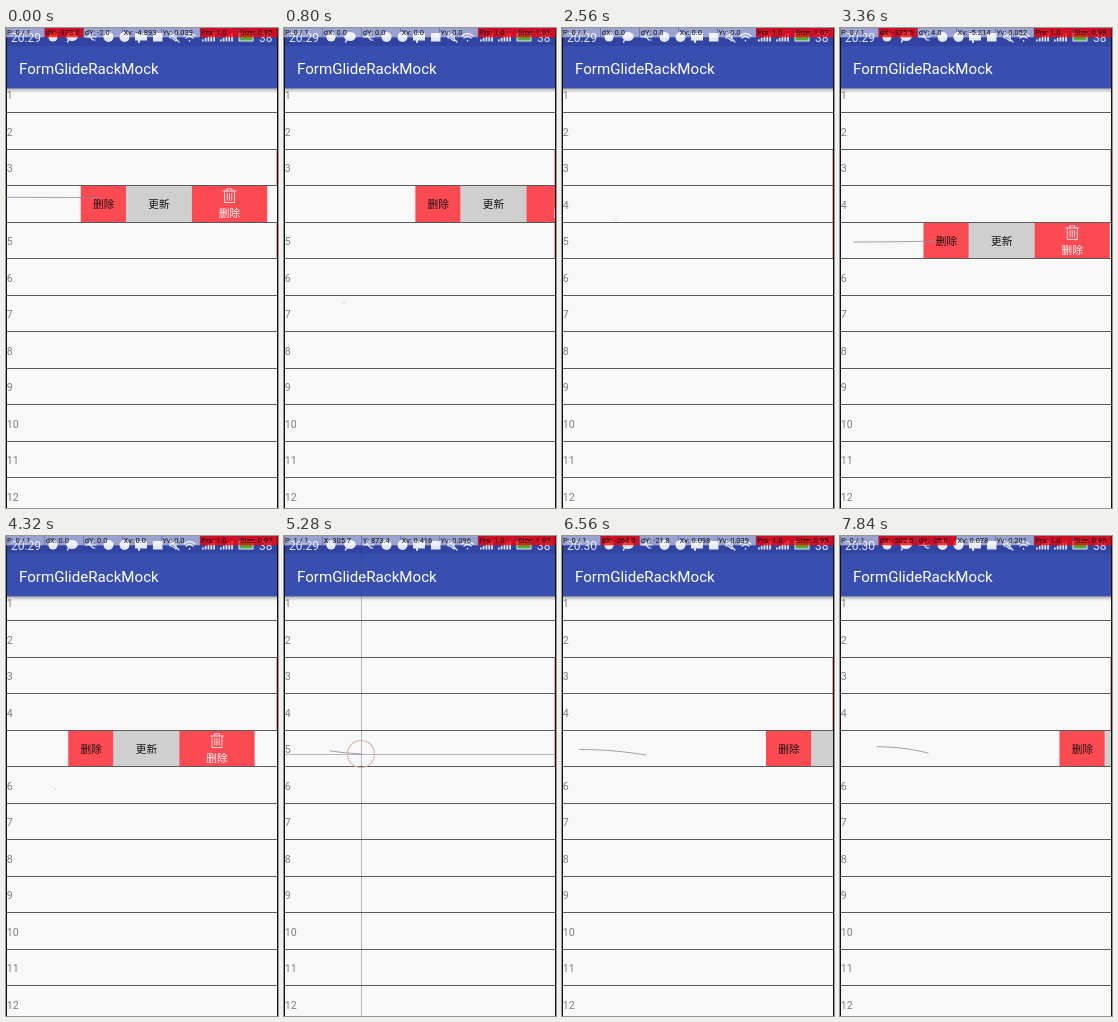
An HTML page that plays this animation: 272x480 px, repeating every 8 s.

```html
<!DOCTYPE html>
<html lang="zh">
<head>
<meta charset="utf-8">
<title>Swipe menu list</title>
<style>
  html, body { margin: 0; width: 100%; height: 100%; overflow: hidden; background: #f8f8f8; }
  svg { display: block; width: 100vw; height: 100vh; }
  text { font-family: Roboto, "Noto Sans CJK SC", "Noto Sans CJK", sans-serif; }
  .number { font-size: 10.6px; fill: #808080; }
  .label { font-family: "Noto Sans CJK SC", "Noto Sans CJK", sans-serif; font-size: 10.7px; text-anchor: middle; }
  .read { font-size: 7.5px; fill: #111; }
  .status { font-size: 12px; fill: #e4e7f5; }
  .line { fill: none; stroke-linecap: round; stroke-linejoin: round; }
</style>
</head>
<body>
<svg id="stage" viewBox="0 0 272 480" preserveAspectRatio="none"></svg>
<script>
const LOOP = 8000, STEP = 160, W = 272, PITCH = 36.5;
const PX = 0.2519;           // stage pixels per device pixel
const SLOP = 24, ANIM = 300;
const BUTTONS = [45.3, 65.8, 75.3];
const MENU = 187, CELL = W / 7;

const touch = (down, up, from, to, xv, yv, size, row, close) =>
  ({ down, up, from, to, xv, yv, size, row, close });
const tap = (down, x, y, size) => touch(down, down + 80, [x, y], [x, y], 0, 0, size);

const touches = [
  touch(-480, -214, [94, 169.8], [0, 169.3], -4.893, 0.039, 0.95, 4, 560),
  tap(560, 60, 275, 1.01),
  touch(960, 1214, [100, 139], [13, 143.5], -9.543, 0.016, 1.03, 3, 2200),
  tap(2200, 54, 191, 1.07),
  touch(3000, 3260, [96, 213], [14, 214], -5.214, 0.052, 0.98, 5, 4160),
  tap(4160, 49.5, 253, 0.97),
  touch(5120, 5440, [46, 215], [108, 219], 0.416, 0.096, 1.07),
  touch(6300, 6560, [84, 219], [17.5, 213.5], 0.098, 0.039, 0.95, 5, 7140),
  tap(7140, 50, 250, 0.99),
  touch(7580, 7840, [88, 217], [37, 210.7], 0.078, 0.201, 0.96, 5, Infinity),
];

const stage = document.getElementById('stage');

function add(tag, attrs, parent = stage, content) {
  const node = document.createElementNS(stage.namespaceURI, tag);
  set(node, attrs);
  if (content !== undefined) node.textContent = content;
  parent.append(node);
  return node;
}
function set(node, attrs) {
  for (const key in attrs) node.setAttribute(key, attrs[key]);
}
const rect = (x, y, width, height, fill, parent) => add('rect', { x, y, width, height, fill }, parent);
const path = (d, stroke, width, parent) =>
  add('path', { d, stroke, 'stroke-width': width, class: 'line' }, parent);
const write = (x, y, cls, content, parent, fill) =>
  add('text', fill ? { x, y, class: cls, fill } : { x, y, class: cls }, parent, content);

const lineY = n => Math.round(47.7 + PITCH * n);   // rule below row n

function buildMenu(row, top) {
  const [a, b, c] = BUTTONS, height = 36;
  const menu = add('g', { transform: `translate(270.5 ${top})` }, row);
  rect(0, 0, a, height, '#fc4a53', menu);
  rect(a, 0, b, height, '#cfcfcf', menu);
  rect(a + b, 0, c, height, '#fc4a53', menu);
  write(a / 2 + 0.3, 22.2, 'label', '删除', menu, '#1c1012');
  write(a + b / 2, 22.2, 'label', '更新', menu, '#111');
  const mid = a + b + c / 2;
  write(mid, 31.4, 'label', '删除', menu, '#fff');
  const bin = add('g', { transform: `translate(${mid} 2)` }, menu);
  path('M-6.5 3H6.5M-2.5 3V.8H2.5V3M-5 3V14.5H5V3M-2.2 5.5V12M0 5.5V12M2.2 5.5V12', '#ffe9ea', 0.9, bin);
}

function buildRows() {
  const rows = [];
  for (let n = 1; n <= 12; n++) {
    const row = add('g', {});
    write(0.7, 71 + PITCH * (n - 1), 'number', n, row);
    if (n >= 3 && n <= 5) buildMenu(row, lineY(n - 1) + 1);
    rows[n] = row;
  }
  for (let n = 1; n < 12; n++) rect(0, lineY(n), W, 1, '#5c5c5e');
  return rows;
}

function buildBars() {
  const shade = add('linearGradient', { id: 'shade', x2: 0, y2: 1 });
  add('stop', { offset: 0, 'stop-color': '#000', 'stop-opacity': 0.3 }, shade);
  add('stop', { offset: 1, 'stop-color': '#000', 'stop-opacity': 0 }, shade);
  rect(0, 60, W, 5, 'url(#shade)');
  rect(0, 0, W, 60.4, '#394fb0');
  rect(0, 0, W, 18, '#3244a2');
  rect(0, 0, 1, 480, '#111');
  rect(271, 0, 1, 480, '#111');
  add('text', { x: 13, y: 45.5, fill: '#fff', 'font-size': 15.1 }, stage, 'FormGlideRackMock');

  const ink = '#e4e7f5';
  const dot = (cx, cy, r) => add('circle', { cx, cy, r, fill: ink });
  dot(47, 9, 4.6);
  add('ellipse', { cx: 66, cy: 8.5, rx: 5.8, ry: 4.6, fill: ink });
  path('M63 11L61.5 14', ink, 1.5);
  path('M79 9H90M82 9L85 6H87M84 9L87 12H89', ink, 1.2);
  dot(102.5, 9, 5);
  dot(118.5, 9, 5);
  rect(129, 5, 12, 7.5, ink);
  path('M133 12V14', ink, 2);
  rect(147, 5, 9.5, 8.5, ink);
  path('M164 8H166L170 5V13L166 10H164ZM163 4L173 14', ink, 1.2);
  path('M178 8Q183.5 3 189 8M180 10Q183.5 7 187 10M183.5 12.5V13', ink, 1.5);
  for (const x of [196, 214])
    for (let i = 0; i < 5; i++) rect(x + i * 2.8, 11.5 - i * 1.6, 1.7, 2 + i * 1.6, ink);
  add('rect', { x: 233, y: 5.5, width: 14, height: 7.5, fill: '#4fa83c', stroke: ink });
  write(253, 14, 'status', '38');
  return write(5, 14, 'status', '20:29');
}

function buildReadout() {
  const cells = [];
  for (let i = 0; i < 7; i++) {
    const back = rect(i * CELL, 0, CELL - 0.4, 9.3, '#fff');
    cells.push({ back, label: write(i * CELL + 1, 7.3, 'read', '') });
  }
  return cells;
}

const rows = buildRows();
const clock = buildBars();
const trail = path('', '#8a8a96', 0.8);
const cross = add('g', {});
const vertical = rect(0, 0, 1, 480, '#234a7059', cross);
const horizontal = rect(0, 0, W, 1, '#33415059', cross);
const ring = add('circle', { r: 13.5, fill: 'none', stroke: '#d8b3aa', 'stroke-width': 1.1 }, cross);
const cells = buildReadout();

const clamp = v => Math.max(0, Math.min(1, v));
const overshoot = p => (p - 1) ** 2 * (3 * (p - 1) + 2) + 1;
const anticipate = p => p * p * (3 * p - 2);
const progress = (g, t) => clamp((t - g.down) / (g.up - g.down));

function pointAt({ from, to }, p) {
  return [from[0] + (to[0] - from[0]) * p, to[1] + (from[1] - to[1]) * (1 - p) ** 2];
}

function openWidth(g, t) {
  if (t < g.down) return 0;
  const dragged = (g.from[0] - g.to[0]) * progress(g, t);
  if (t < g.up) return dragged;
  if (t < g.close) return dragged + (MENU - dragged) * overshoot(clamp((t - g.up) / ANIM));
  return MENU * (1 - anticipate(clamp((t - g.close) / ANIM)));
}

function drawReadout(g, held, x, y) {
  const dx = (x - g.from[0]) / PX, dy = (y - g.from[1]) / PX;
  const labels = [
    `P: ${held ? 1 : 0} / 1`,
    held ? `X: ${(x / PX).toFixed(1)}` : `dX: ${dx.toFixed(1)}`,
    held ? `Y: ${((y + 2) / PX).toFixed(1)}` : `dY: ${dy.toFixed(1)}`,
    `Xv: ${g.xv || '0.0'}`, `Yv: ${g.yv || '0.0'}`,
    'Prs: 1.0', `Size: ${g.size.toFixed(2)}`,
  ];
  const hot = [false, !held && Math.abs(dx) > SLOP, !held && Math.abs(dy) > SLOP, false, false, true, true];
  cells.forEach(({ back, label }, i) => {
    set(back, { fill: hot[i] ? '#f00' : '#fff', 'fill-opacity': hot[i] ? 0.76 : 0.5 });
    label.textContent = labels[i];
  });
}

function draw(t) {
  const g = touches.filter(item => item.down <= t).pop();
  const p = progress(g, t), held = t < g.up;
  const [x, y] = pointAt(g, p);

  const open = {};
  for (const item of touches)
    if (item.row) open[item.row] = (open[item.row] || 0) + openWidth(item, t);
  for (const n in open) set(rows[n], { transform: `translate(${-open[n]} 0)` });

  const points = Array.from({ length: 13 }, (_, i) => pointAt(g, p * i / 12).join(' '));
  set(trail, { d: 'M' + points.join('L') });
  set(cross, { visibility: held ? 'visible' : 'hidden' });
  set(vertical, { x: Math.round(x) });
  set(horizontal, { y: Math.round(y) });
  set(ring, { cx: x, cy: y });

  clock.textContent = t < 5920 ? '20:29' : '20:30';
  drawReadout(g, held, x, y);
}

const start = performance.now();
function tick() {
  const t = (performance.now() - start) % LOOP;
  draw(Math.floor(t / STEP) * STEP);
  requestAnimationFrame(tick);
}
tick();
</script>
</body>
</html>
```
